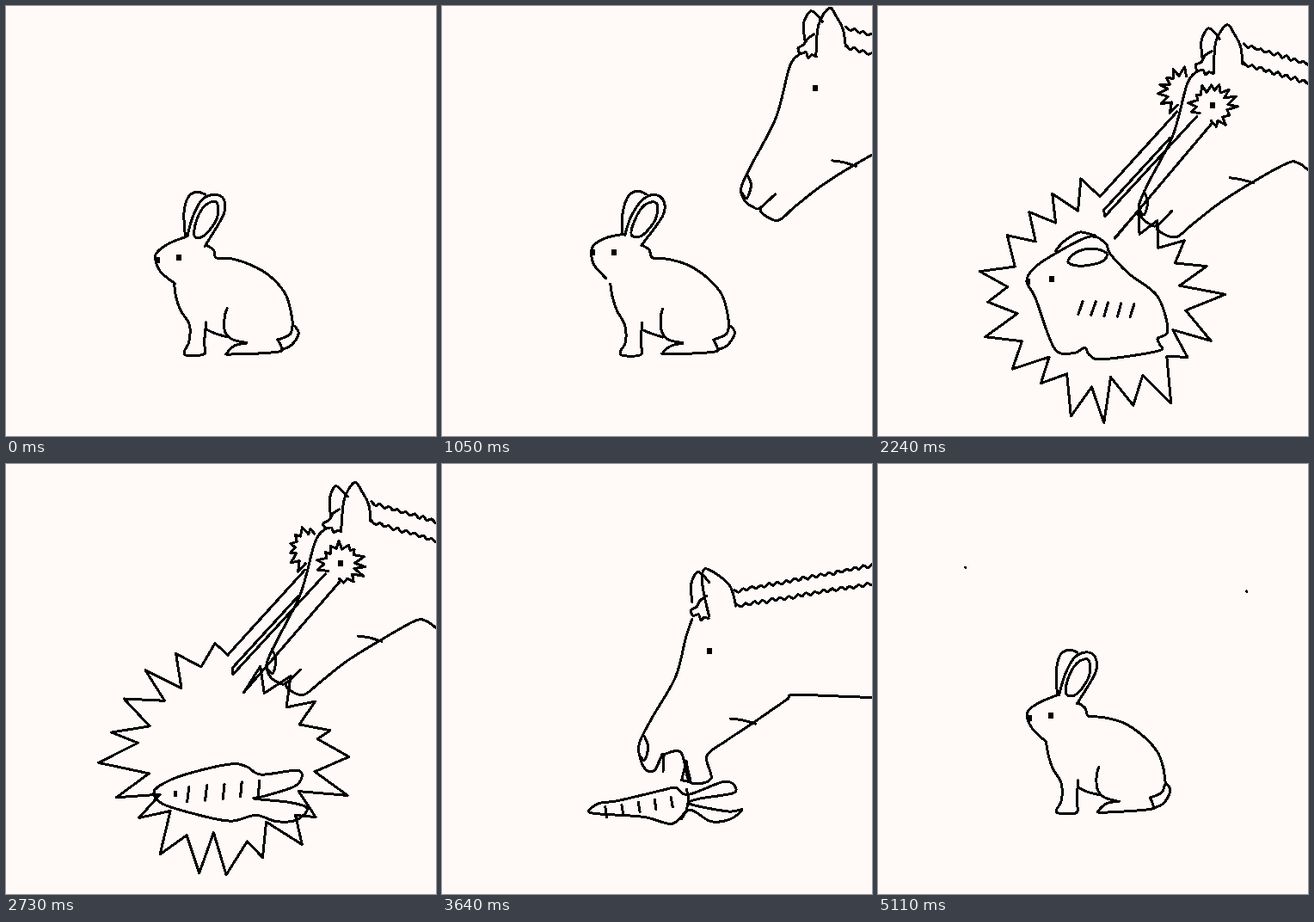
Animation, 500 px wide and 500 px high, one loop 5.18 s. Source, as an HTML page:

```html
<!DOCTYPE html>
<html lang="en">
<head>
<meta charset="utf-8">
<title>Rabbit, horse, carrot</title>
<style>
html, body { margin: 0; height: 100%; overflow: hidden; background: #fff9f8; }
svg { display: block; width: 100%; height: 100%; }
path { fill: none; stroke: #000; shape-rendering: crispEdges; }
#ink { stroke-width: 3; stroke-linecap: round; stroke-linejoin: round; }
#dots { stroke-width: 7; }
</style>
</head>
<body>
<svg viewBox="0 0 500 500"><path id="ink"/><path id="dots"/></svg>
<script>
const LOOP = 5180, STEP = 70;

// Shapes are flat lists: x, y, x, y, ...
const backEar = [208,268, 207,240, 212,222, 222,216, 232,219];
const innerEar = [219,268, 221,250, 231,232, 245,228, 245,247, 231,267];
const blobBackEar = [206,285, 215,275, 225,268, 236,263, 252,267];
const blobInnerEar = [221,298, 230,287, 250,282, 266,288, 260,298, 236,302];

// Outline on its way from rabbit to carrot
const morphTimes = [1750, 2240, 2730, 2940];
const rabbit = [174,295, 190,276, 211,268, 230,224, 253,225, 248,256, 245,293, 318,326, 336,372,
  338,382, 300,403, 280,404, 258,400, 262,388, 233,378, 231,405, 210,405, 197,325];
const blob = [173,320, 182,304, 206,288, 245,268, 264,276, 270,288, 292,312, 325,337, 337,377,
  325,387, 327,393, 326,401, 262,411, 246,406, 240,397, 228,404, 205,398, 183,340];
const fatCarrot = [172,381, 185,370, 210,360, 260,349, 280,352, 297,361, 340,357, 338,374, 300,386,
  289,389, 330,393, 350,400, 338,414, 314,416, 290,408, 262,415, 225,408, 183,395];
const thinCarrot = [171,404, 183,395, 205,392, 258,379, 272,376, 286,384, 330,369, 340,382, 300,389,
  288,395, 333,404, 349,402, 335,413, 312,416, 288,402, 268,418, 235,410, 183,407];
// Row of marks: start x, y, step x, y, then height and slant
const blobMarks = [238,343, 15,1, 15,-5], fatMarks = [213,376, 20.5,-2, 17,-2], thinMarks = [190,399, 19,-3, 12,2];

let ink, dots, seed, dx, dy;

const ramp = (t, a, b) => Math.min(1, Math.max(0, (t - a) / (b - a)));
const mix = (a, b, p) => a.map((v, i) => v + (b[i] - v) * p);
const random = () => { const v = Math.sin(++seed * 12.9898) * 43758.5453; return v - Math.floor(v); };

function morph(shapes, t) {
  let i = 0;
  while (i < shapes.length - 2 && t >= morphTimes[i + 1]) i++;
  return mix(shapes[i], shapes[i + 1], ramp(t, morphTimes[i], morphTimes[i + 1]));
}

// Points at the current offset, with a slight hand-drawn wobble
function points(flat) {
  const out = [];
  for (let i = 0; i < flat.length; i += 2)
    out.push([flat[i] + dx + random() - .5, flat[i + 1] + dy + random() - .5]);
  return out;
}

const line = flat => { ink += 'M' + points(flat).join('L'); };
const dot = (x, y, w = 6) => { dots += `M${x + dx - w / 2},${y + dy}h${w}`; };

function curve(flat, closed = false) {
  const p = points(flat), n = p.length;
  const at = i => closed ? p[(i + n) % n] : p[Math.min(n - 1, Math.max(0, i))];
  const handle = (from, lo, hi) => from.map((v, k) => v + (hi[k] - lo[k]) / 6);
  ink += 'M' + p[0];
  for (let i = 0; i < n - !closed; i++) {
    const [a, b, c, d] = [at(i - 1), at(i), at(i + 1), at(i + 2)];
    ink += 'C' + [handle(b, a, c), handle(c, d, b), c];
  }
}

// Turn about the neck of the rabbit
function turn(flat, angle) {
  const c = Math.cos(angle), s = Math.sin(angle);
  return flat.map((v, i) => i % 2
    ? 285 + (flat[i - 1] - 236) * s + (v - 285) * c
    : 236 + (v - 236) * c - (flat[i + 1] - 285) * s);
}

function drawRabbit(t) {
  const tilt = ramp(t, 630, 980) - ramp(t, 1330, 1540);
  const head = .14 * tilt, ears = .08 * tilt;
  curve(turn([211,268, 190,276, 176,286, 174,295, 180,309, 196,323], head));
  curve(turn(backEar, ears));
  curve(turn([211,268, 217,246, 228,226, 242,219, 253,225, 253,243, 231,279], ears));
  curve(turn(innerEar, ears), true);
  dot(...turn([200.5, 292], head));
  dot(...turn([176, 295], head), 5);
  curve([196,323, 198,338, 203,354, 213,371, 213,391, 208,401, 210,406, 231,405, 231,391, 233,368]);
  curve([233,376, 243,381, 257,385]);
  curve([257,352, 254,362, 255,378, 263,388, 280,392]);
  curve([280,392, 266,395, 257,403, 262,405, 315,402, 320,397, 316,388]);
  curve([234,279, 241,284, 245,293, 262,294, 285,301, 306,314, 324,334, 331,352, 334,372]);
  curve([320,400, 332,394, 340,380, 334,372, 330,382, 316,388]);
}

function drawMorph(t) {
  curve(morph([rabbit, blob, fatCarrot, thinCarrot], t), true);
  if (t < 2500) {
    const p = ramp(t, 1750, 2240);
    curve(mix(backEar, blobBackEar, p));
    curve(mix(innerEar, blobInnerEar, p), true);
    dot(...mix([176, 295], [174, 320], p), 5);
  }
  if (t > 2000) {
    const [x, y, stepX, stepY, height, slant] = morph([blobMarks, blobMarks, fatMarks, thinMarks], t);
    for (let i = 0; i < 5; i++) {
      const mx = x + i * stepX, my = y + i * stepY;
      line([mx, my, mx + slant, my + height]);
    }
  }
  if (t < 2870) dot(...morph([[200, 292], [202, 317], [197, 383]], t), t < 2500 ? 6 : 4);
  else curve([284,378, 286,390, 284,403, 278,413]);
}

function drawMane([x1, y1, x2, y2]) {
  const n = Math.round((x2 - x1) / 5), wave = [];
  for (let i = 0; i <= n; i++)
    wave.push(x1 + (x2 - x1) * i / n, y1 + (y2 - y1) * i / n + (i % 2 ? 1.8 : -1.4));
  curve(wave);
}

// The horse blends from standing upright to grazing
function drawHorse(t) {
  const g = ramp(t, 3360, 3640), p = g * g * (3 - 2 * g);
  const move = (flat, x, y) => flat.map((v, i) => v + p * (i % 2 ? y : x));
  curve(move([377,60, 376,40, 383,26, 390,30, 397,38], -86, 100));
  curve(move([388,53, 380,58, 376,65, 369,69, 372,75, 378,74, 381,80, 385,77, 390,79], -80, 101));
  curve(move([409,200, 422,202, 437,206], -73, 96));
  curve(move([309,215, 314,228, 310,243, 304,238], -74, 101));
  dot(...move([389, 115], -78, 102));
  curve(mix([390,78, 393,42, 405,22, 414,33, 422,48, 424,67],
            [311,177, 303,142, 305,122, 322,130, 336,143, 342,165], p));
  curve(mix([372,75, 360,90, 343,150, 315,205, 303,232, 307,247, 317,254, 325,255, 342,239],
            [291,180, 284,202, 272,248, 245,295, 229,325, 231,343, 238,356, 248,356, 256,338], p));
  curve(mix([325,255, 325,255, 328,262, 346,269, 365,254, 395,230, 430,208, 475,183, 488,183, 500,191, 530,220],
            [256,338, 278,335, 288,369, 313,366, 308,340, 330,322, 360,303, 400,275, 412,269, 500,272, 620,274], p));
  drawMane(mix([425,45, 545,80], [340,148, 600,99], p));
  drawMane(mix([425,67, 545,102], [343,165, 600,122], p));
  if (p > .9) {
    line([248,356, 254,342, 258,338, 257,357]);
    line([284,346, 279,368, 289,370, 284,346]);
  }
}

// Jagged arc; radius(i, u) gives the distance of corner i at fraction u
function jagged(x, y, from, to, spikes, radius) {
  const flat = [], n = spikes * 2;
  for (let i = 0; i <= n; i++) {
    const shift = i % n ? .7 * (random() - .5) : 0;
    const a = (from + (to - from) * (i + shift) / n) * Math.PI / 180, r = radius(i, i / n);
    flat.push(x + r * Math.cos(a), y + r * Math.sin(a));
  }
  line(flat);
  return flat;
}

function drawLaser(t) {
  const eyeStar = i => i % 2 ? 22 + 9 * random() : 16 + 3 * random();
  jagged(389, 116, 150, 455, 12, eyeStar);
  jagged(354, 99, 110, 285, 7, eyeStar);
  const size = ramp(t, 1400, 1610);
  const burst = jagged(258, 335, -90, -435, 20, (i, u) =>
    size * Math.min(1, .72 + (1 - u) * 1.3) * (i % 2 ? 124 + 28 * random() : u ? 92 + 16 * random() : 113));
  line([348, 123, ...burst.slice(0, 2)]);
  line([340,153, 263,237, 264,245, 371,128]);
  line([388, 137, ...burst.slice(-2)]);
}

function drawSparks(t) {
  const k = (t - 4900) / STEP;
  if (k > 2) {
    line([101,120, 102,120]);
    line([429,148, 429,149]);
    return;
  }
  const center = [257, 300];
  for (const end of [[101,120], [429,148], [82,250], [442,270], [180,120], [320,120]])
    line([...mix(center, end, .4 + .22 * k), ...mix(center, end, .6 + .17 * k)]);
}

function draw(t) {
  ink = dots = '';
  seed = t;
  dx = dy = 0;
  if (t <= 1750 || t >= 4900) drawRabbit(t);
  if (t >= 4900) drawSparks(t);
  if (t >= 1400 && t < 3010) drawLaser(t);

  const lift = ramp(t, 3710, 3920), leave = 345 * ramp(t, 3920, 4410) ** 1.3;
  const liftX = 10 * lift + leave, liftY = -40 * lift - .5 * leave;
  if (t > 1750 && t < 4410) {
    dx = liftX;
    dy = liftY;
    drawMorph(t);
  }
  if (t > 280 && t < 4410) {
    const away = 229 * (1 - ramp(t, 280, 1400)) ** 1.4;
    dx = away + liftX;
    dy = -.444 * away + 25 * ramp(t, 3640, 3710) + liftY;
    drawHorse(t);
  }
  document.getElementById('ink').setAttribute('d', ink);
  document.getElementById('dots').setAttribute('d', dots);
}

function tick() {
  draw(Math.floor(performance.now() % LOOP / STEP) * STEP);
  requestAnimationFrame(tick);
}
tick();
</script>
</body>
</html>
```
